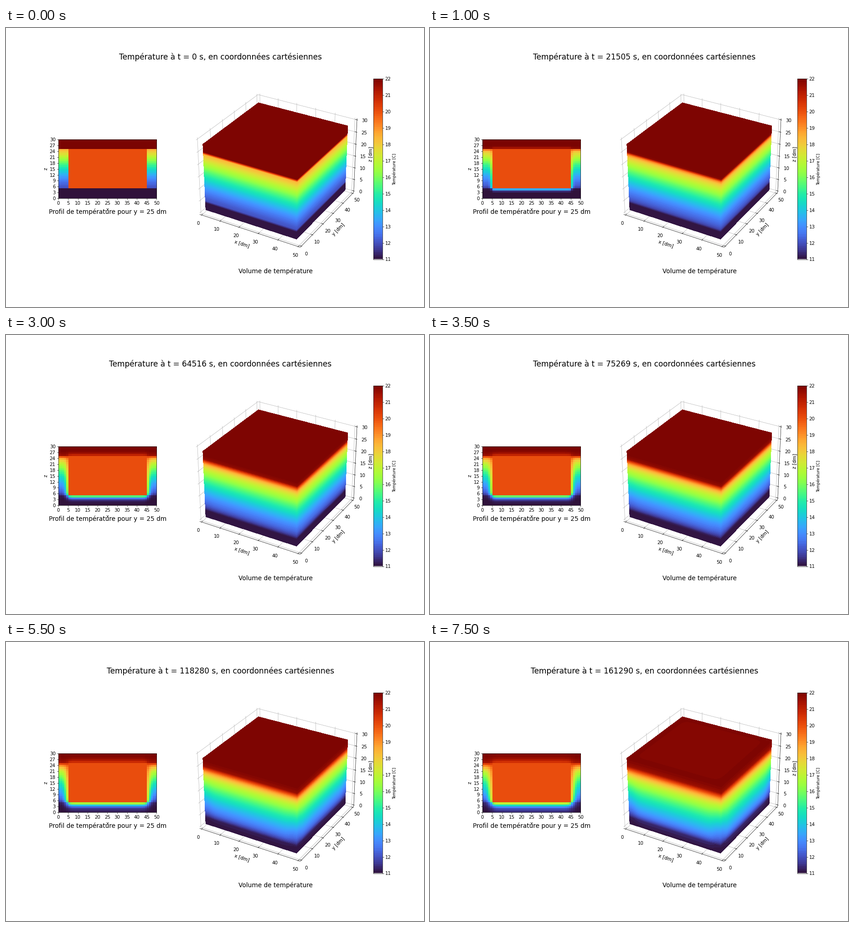
Recreate the animation shown at these times as a matplotlib script. Size 917 by 611 pixels, loop 8000 ms.

```python
import numpy as np
import matplotlib.pyplot as plt
from matplotlib.animation import FuncAnimation

W, H = 917, 611
PT = W / 1080            # pixels per point of a 15 inch wide figure
FRAMES, INTERVAL = 16, 500
NX, NY, NZ = 50, 50, 30
T_MIN, T_MAX, T_ROOM = 11, 22, 20

plt.rcParams.update({
    "font.family": "DejaVu Sans",
    "font.size": 12 * PT,
    "axes.linewidth": 0.8 * PT,
    "axes.labelpad": 4 * PT,
    "xtick.major.size": 3.5 * PT, "ytick.major.size": 3.5 * PT,
    "xtick.major.width": 0.8 * PT, "ytick.major.width": 0.8 * PT,
    "xtick.major.pad": 3.5 * PT, "ytick.major.pad": 3.5 * PT,
})

# --- heat diffusion -------------------------------------------------------

ROOM = (slice(5, 45), slice(5, 45), slice(5, 25))
FLOOR_TOP, ROOF_BASE = 4, 25
RATE = 0.18              # cells squared per frame
WALL_TO_SLAB = 0.2       # the heavy slabs hardly feel the light walls


def initial_field():
    z = np.arange(NZ)
    wall = 12 + 6.4 * np.clip((z - 5) / 19, 0, 1) ** 1.3
    profile = np.where(z <= FLOOR_TOP, T_MIN,
                       np.where(z >= ROOF_BASE, T_MAX, wall))
    field = np.tile(profile.astype(float), (NX, NY, 1))
    field[ROOM] = T_ROOM
    return field


def vertical_weights():
    above_wall = np.full((NX, NY), WALL_TO_SLAB)
    above_wall[ROOM[:2]] = 1
    up, down = np.ones((2, NX, NY, NZ))
    up[..., FLOOR_TOP] = down[..., ROOF_BASE] = above_wall
    return up, down


UP, DOWN = vertical_weights()


def diffuse(field, rate):
    p = np.pad(field, 1, mode="edge")
    c = slice(1, -1)
    flow = (p[2:, c, c] + p[:-2, c, c] + p[c, 2:, c] + p[c, :-2, c] - 4 * field
            + UP * (p[c, c, 2:] - field) + DOWN * (p[c, c, :-2] - field))
    out = field + rate * flow
    out[ROOM] = T_ROOM
    return np.clip(out, T_MIN, T_MAX)


def simulate(substeps=4):
    fields = [initial_field()]
    while len(fields) < FRAMES:
        field = fields[-1]
        for _ in range(substeps):
            field = diffuse(field, RATE / substeps)
        fields.append(field)
    return fields


FIELDS = simulate()

# --- perspective view -----------------------------------------------------

SCALE, CX, CY = 2123, 596.9, 303.3
ELEV, AZIM = np.radians(30), np.radians(-60)


def project(x, y, z):
    """Box coordinates in dm to stage pixels."""
    x = 4 / 7 * (np.asarray(x, float) / 25 - 1)
    y = 4 / 7 * (np.asarray(y, float) / 25 - 1)
    z = 3 / 7 * (np.asarray(z, float) / 15 - 1)
    ce, se, ca, sa = np.cos(ELEV), np.sin(ELEV), np.cos(AZIM), np.sin(AZIM)
    right = -sa * x + ca * y
    up = -se * ca * x - se * sa * y + ce * z
    near = ce * ca * x + ce * sa * y + se * z
    k = SCALE / (10 - near)
    return CX + k * right, CY - k * up


fig = plt.figure(figsize=(W / 72, H / 72), dpi=72, facecolor="white")


def pixel_axes(x0, y0, x1, y1):
    return fig.add_axes([x0 / W, 1 - y1 / H, (x1 - x0) / W, (y1 - y0) / H])


stage = pixel_axes(0, 0, W, H)
stage.set(xlim=(0, W), ylim=(H, 0))
stage.axis("off")


def label(x, y, text, size=12, **kw):
    kw = {"ha": "center", "va": "center", **kw}
    return stage.text(x, y, text, fontsize=size * PT, **kw)


def line3d(a, b, color="black", z=1.5):
    x, y = project(*zip(a, b))
    stage.plot(x, y, color=color, lw=0.8 * PT, zorder=z, solid_capstyle="butt")


LO, HI = -25 / 24, 50 + 25 / 24
ZLO, ZHI = -0.625, 30.625
TICKS, ZTICKS = range(0, 51, 10), range(0, 31, 5)


def draw_box():
    def grid(*points):
        for a, b in zip(points, points[1:]):
            line3d(a, b, "#b0b0b0", 1)

    for t in TICKS:
        grid((t, LO, ZLO), (t, HI, ZLO), (t, HI, ZHI))
        grid((HI, t, ZLO), (LO, t, ZLO), (LO, t, ZHI))
    for t in ZTICKS:
        grid((LO, LO, t), (LO, HI, t), (HI, HI, t))

    line3d((LO, LO, ZLO), (HI, LO, ZLO))
    line3d((HI, LO, ZLO), (HI, HI, ZLO))
    line3d((HI, HI, ZLO), (HI, HI, ZHI))

    out, inn = 0.434, 0.868
    for t in TICKS:
        line3d((t, LO - out, ZLO), (t, LO + inn, ZLO))
        x, y = project(t, LO, ZLO)
        label(x - 7.1 + 0.01 * t, y + 18.5 + 0.02 * t, t)
        line3d((HI + out, t, ZLO), (HI - inn, t, ZLO))
        x, y = project(HI, t, ZLO)
        label(x + 11 - 0.038 * t, y + 17.1 - 0.046 * t, t)
    for t in ZTICKS:
        line3d((HI + out, HI, t), (HI - inn, HI, t))
        y = project(HI, HI, t)[1]
        label(774.2 + 0.19 * t, y + 1.7, t, ha="left")

    label(518, 473, "x [dm]", rotation=-18)
    label(729.5, 441, "y [dm]", rotation=45.7)
    label(800, 276.5, "z [dm]", rotation=87.4)


draw_box()

# --- colour bar -----------------------------------------------------------

LEVELS = np.linspace(T_MIN, T_MAX, 101)
MIDS = (LEVELS[1:] + LEVELS[:-1]) / 2
CMAP = plt.get_cmap("turbo")
COLORS = CMAP((MIDS - T_MIN) / (T_MAX - T_MIN))
FILL_LEVELS = LEVELS.copy()
FILL_LEVELS[[0, -1]] += -0.1, 0.1

bar = pixel_axes(806, 110.9, 825.8, 506.5)
bar.imshow(COLORS[:, None, :], origin="lower", aspect="auto",
           extent=(0, 1, T_MIN, T_MAX), interpolation="nearest")
bar.set_xticks([])
bar.set_yticks(range(T_MIN, T_MAX + 1))
bar.yaxis.tick_right()
label(852, 309, "Température [C]", 10, rotation=90)

# --- profile --------------------------------------------------------------

profile = pixel_axes(114.6, 243.9, 330.2, 373.3)
image = profile.imshow(FIELDS[0][:, 25, :].T, origin="lower", cmap=CMAP,
                       vmin=T_MIN, vmax=T_MAX, extent=(0, NX, 0, NZ),
                       aspect="auto", interpolation="nearest")
profile.set(xticks=range(0, 51, 5), yticks=range(0, 31, 3),
            xlabel="x", ylabel="z")

# --- titles ---------------------------------------------------------------

title = label(470.5, 69, "", 20, va="baseline")
label(222.9, 407, "Profil de température pour y = 25 dm", 16, va="baseline")
label(591.5, 537, "Volume de température", 16, va="baseline")

# --- volume faces ---------------------------------------------------------

X0, X1, Z0, Z1 = 1, 48, 1, 28
side, height = np.arange(X0, X1 + 1), np.arange(Z0, Z1 + 1)
A, B = np.meshgrid(side, side, indexing="ij")
C, D = np.meshgrid(side, height, indexing="ij")
in_side, in_height = slice(X0, X1 + 1), slice(Z0, Z1 + 1)
FACES = [
    (project(A, B, np.full(A.shape, Z1)), (in_side, in_side, Z1)),
    (project(C, np.full(C.shape, X0), D), (in_side, X0, in_height)),
    (project(np.full(C.shape, X1), C, D), (X1, in_side, in_height)),
]
drawn = []


def update(i):
    field = FIELDS[i]
    while drawn:
        drawn.pop().remove()
    for (px, py), part in FACES:
        drawn.append(stage.contourf(px, py, field[part], levels=FILL_LEVELS,
                                    colors=COLORS, zorder=2))
    image.set_data(field[:, 25, :].T)
    seconds = round(i * 1e6 / 93)
    title.set_text(f"Température à t = {seconds} s, en coordonnées cartésiennes")
    return [image, title]


anim = FuncAnimation(fig, update, frames=FRAMES, interval=INTERVAL,
                     repeat=True, repeat_delay=0, blit=False)
plt.show()
```
